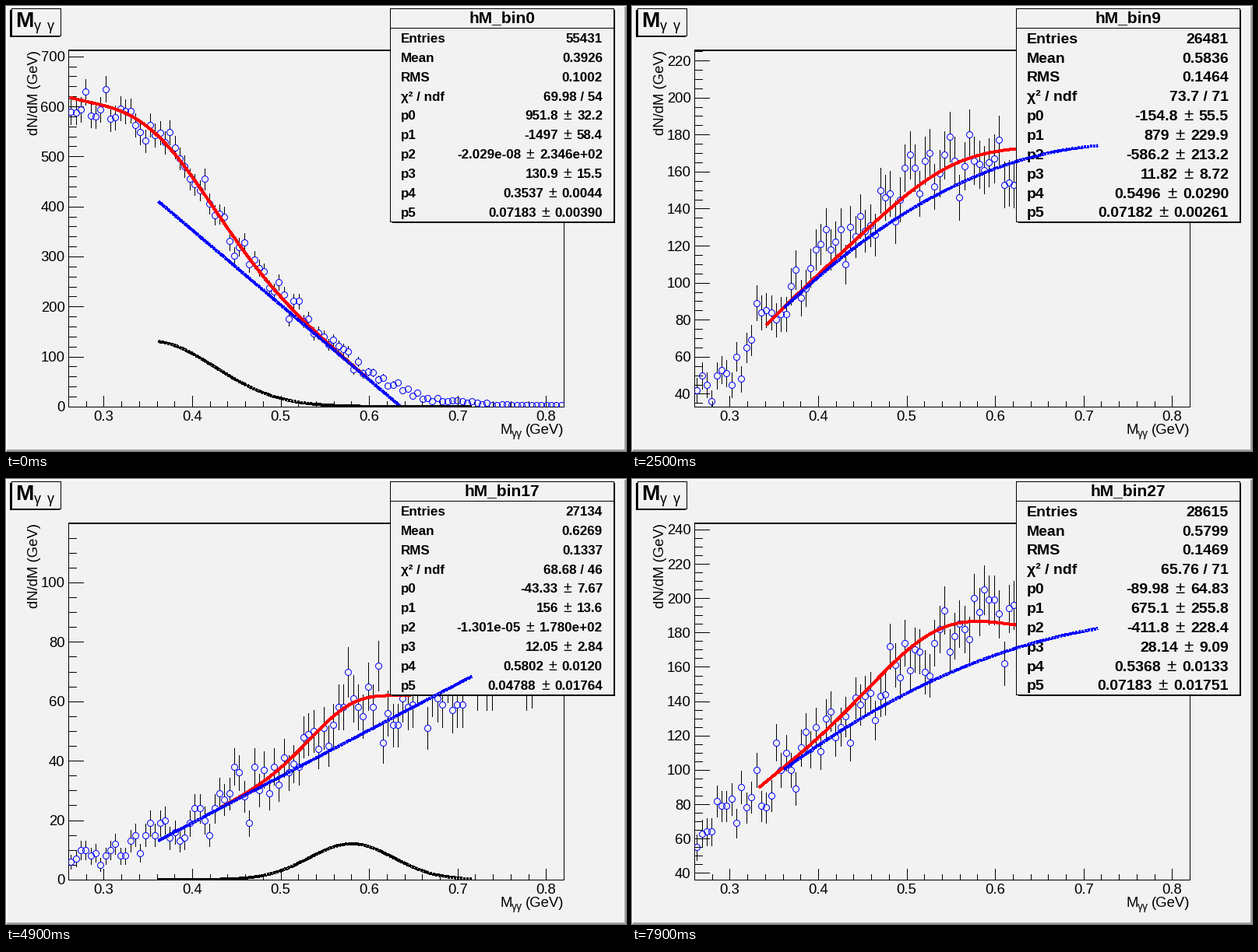
A matplotlib script for the animation above (8 s loop, 796 by 572 pixels).

```python
import numpy as np
import matplotlib.pyplot as plt
from matplotlib.animation import FuncAnimation
from matplotlib.patches import Rectangle

W, H, DPI = 796, 572, 100
PT = 72 / DPI
LEFT, RIGHT, TOP, BOTTOM = 80, 716, 57, 514.9
X_MIN, X_MAX, BIN = 0.26, 0.82, 0.0056
PAPER, BLUE = "#f2f2f2", "#0000ff"

# Key histograms; those in between are blended. Each holds the axis limits,
# the statistics, and the values and errors of the fit shown in the box:
# a quadratic background, then height, mean and sigma of the peak.
KEYS = {
    0: ((0, 712), (55431, .3926, .1002, 69.98, 54),
        (951.8, -1497, -2.029e-8, 130.9, .3537, .07183),
        (32.2, 58.4, 234.6, 15.5, .0044, .0039)),
    5: ((8.2, 212.5), (28101, .5931, .1419, 37, 47),
        (-14.02, 255.4, -1.216e-5, 34.07, .5624, .04788),
        (12.1, 22.4, 455, 4.75, .0074, .01528)),
    9: ((33.1, 225.5), (26481, .5836, .1464, 73.7, 71),
        (-154.8, 879, -586.2, 11.82, .5496, .07182),
        (55.5, 229.9, 213.2, 8.72, .029, .00261)),
    12: ((17.9, 682.8), (64323, .4793, .1331, 91.57, 71),
         (90.38, 2404, -3186, 80.67, .4929, .07183),
         (84.24, 361, 346.2, 13.61, .0083, .00163)),
    17: ((0, 119.9), (27134, .6269, .1337, 68.68, 46),
         (-43.33, 156, -1.301e-5, 12.05, .5802, .04788),
         (7.67, 13.6, 178, 2.84, .012, .01764)),
    23: ((18, 225.4), (30579, .5937, .1421, 48.96, 53),
         (-13.21, 269.1, -13.33, 47.79, .5674, .0522),
         (6.77, 4.9, 14.49, 4.75, .006, .0067)),
    27: ((36.1, 243.6), (28615, .5799, .1469, 65.76, 71),
         (-89.98, 675.1, -411.8, 28.14, .5368, .07183),
         (64.83, 255.8, 228.4, 9.09, .0133, .01751)),
}

fig = plt.figure(figsize=(W / DPI, H / DPI), dpi=DPI, facecolor=PAPER)
ax = fig.add_axes([0, 0, 1, 1])
ax.set(xlim=(0, W), ylim=(H, 0))
ax.axis("off")
frame_clip = Rectangle((LEFT, TOP), RIGHT - LEFT, BOTTOM - TOP,
                       transform=ax.transData)
moving = []


def px(x):
    return LEFT + (x - X_MIN) / (X_MAX - X_MIN) * (RIGHT - LEFT)


def text(x, y, s, size, ha="left", weight="normal", **kw):
    return ax.text(x, y, s, fontsize=size * PT, ha=ha, va="baseline",
                   weight=weight, family="Liberation Sans", zorder=5, **kw)


def box(x0, y0, x1, y1, color, z=4, edge="none"):
    ax.add_patch(Rectangle((x0, y0), x1 - x0, y1 - y0, fc=color, ec=edge,
                           lw=PT, zorder=z, antialiased=False))


def line(x, y, color="black", width=1, **kw):
    return ax.plot(x, y, color=color, lw=width * PT, antialiased=False,
                   solid_capstyle="butt", **kw)[0]


def segments(x0, y0, x1, y1, **kw):
    """Draw many short strokes as one line with gaps."""
    x0, y0, x1, y1 = np.broadcast_arrays(x0, y0, x1, y1)
    gap = np.full(x0.shape, np.nan)
    return line(np.column_stack([x0, x1, gap]).ravel(),
                np.column_stack([y0, y1, gap]).ravel(), **kw)


def draw_static():
    box(0, 0, W, 2, "#fcfcfc", 0)
    box(0, 0, 2, H, "#fcfcfc", 0)
    box(W - 2, 1, W, H, "#a1a1a1", 0)
    box(1, H - 2, W, H, "#a1a1a1", 0)

    line([LEFT, LEFT], [TOP, BOTTOM])
    line([RIGHT, RIGHT], [TOP, BOTTOM])
    line([LEFT, RIGHT], [BOTTOM, BOTTOM])
    line([LEFT, RIGHT], [TOP, TOP], width=2)

    for i in range(13, 42):
        x = px(i * 0.02)
        major = i % 5 == 0
        line([x, x], [BOTTOM, BOTTOM - (14 if major else 7)])
        if major:
            text(x, 533, f"{i * 0.02:.1f}", 18.5, "center")
    text(634, 550, "M", 18.5)
    text(649, 554, "γγ", 14)
    text(716, 550, "(GeV)", 18.5, "right")
    text(41, TOP, "dN/dM (GeV)", 18.5, "right", rotation=90,
         rotation_mode="anchor")

    box(5, 5, 69, 40, "black")
    box(7, 3, 70, 38, PAPER, 4.1, "black")
    text(12, 27, "M", 28, weight="bold")
    text(36, 31, "γ", 18)
    text(53, 31, "γ", 18)

    box(496, 5, 782, 279, "black")
    box(493, 3, 780, 277, PAPER, 4.1, "black")
    line([493, 781], [28, 28], zorder=4.2)


def blend(n):
    """Limits, statistics, values and errors of histogram n."""
    return [np.array([np.interp(n, list(KEYS), column)
                      for column in zip(*group)])
            for group in zip(*KEYS.values())]


def value_with_error(value, error):
    shown = f"{value:.4g}"
    if "e" in shown:
        return shown, f"{error:.3e}"
    decimals = max(1, len(shown.partition(".")[2]))
    return shown, f"{error:.{decimals}f}"


def draw_stats(n, stats, values, errors):
    entries, mean, rms, chi2, ndf = stats
    size = 17 if abs(values[2]) < 1e-3 else 19.5
    moving.append(text(636.5, 21, f"hM_bin{n}", 21, "center", "bold"))

    rows = [("Entries", f"{entries:.0f}"), ("Mean", f"{mean:.4g}"),
            ("RMS", f"{rms:.4g}"), ("χ² / ndf", f"{chi2:.4g} / {ndf:.0f}")]
    rows += [(f"p{i}", value_with_error(*pair))
             for i, pair in enumerate(zip(values, errors))]
    to_px = ax.transData.inverted()
    for i, (name, shown) in enumerate(rows):
        y = 47 + 24.85 * i + (size - 17) * 0.3
        moving.append(text(507, y, name, size, weight="bold"))
        if isinstance(shown, str):
            moving.append(text(766, y, shown, size, "right", "bold"))
            continue
        error = text(766, y, shown[1], size, "right", "bold")
        extent = error.get_window_extent()
        start = to_px.transform((extent.x0, extent.y0))[0]
        moving.extend([
            error,
            text(start - 0.7 * size, y, "±", size * 1.15, "center"),
            text(start - 1.41 * size, y, shown[0], size, "right", "bold")])


def draw_y_axis(lo, hi, py):
    step = next(s for s in (10, 20, 50, 100, 200) if (hi - lo) / s <= 10.5)
    parts = 4 if step in (20, 200) else 5
    minor = step / parts
    ticks = np.arange(np.ceil(lo / minor), np.floor(hi / minor) + 1)
    y = py(ticks * minor)
    moving.append(segments(LEFT, y, LEFT + np.where(ticks % parts, 10, 19), y))
    for t in ticks[ticks % parts == 0]:
        moving.append(text(75.5, py(t * minor) + 6.5, f"{t * minor:.0f}",
                           18.5, "right"))


def draw_points(n, model, softness, py):
    centers = X_MIN + BIN * (np.arange(100) + 0.5)
    # The spectrum follows the fit but levels off smoothly above zero.
    trend = softness * np.logaddexp(0, model(centers) / softness)
    noise = np.random.default_rng(40 + n).normal(size=100).clip(-2, 2)
    counts = np.maximum(trend + np.sqrt(trend) * noise, 3).round()
    x, y = px(centers), py(counts)
    artists = ax.plot(x, y, "o", ms=8 * PT, mfc="none", mec=BLUE, mew=PT,
                      zorder=2.1)
    for sign in (-1, 1):
        reach = np.maximum(y - py(counts + np.sqrt(counts)), 4)
        artists.append(segments(x, y + sign * 4, x, y + sign * reach, zorder=2))
    return artists


def draw_curves(values, ndf, background, peak, py):
    # The fit window leans towards the middle of the axis.
    center, half = 0.2 + 0.65 * values[4], BIN * (ndf + 6) / 2
    fit_x = np.linspace(max(center - half, X_MIN), center + half, 150)
    part_x = np.linspace(0.362, 0.716, 150)
    dotted = dict(width=2.6, zorder=6, linestyle=(0, (1.1, 0.6)),
                  dash_capstyle="butt")
    return [
        line(px(fit_x), py(background(fit_x) + peak(fit_x)), "red", 3, zorder=3),
        line(px(part_x), py(background(part_x)), BLUE, **dotted),
        line(px(part_x), py(peak(part_x)), **dotted)]


def update(i):
    while moving:
        moving.pop().remove()
    n = (i + 2) // 3
    (lo, hi), stats, values, errors = blend(n)
    p0, p1, p2, height, mean, sigma = values

    def py(v):
        return BOTTOM - (v - lo) / (hi - lo) * (BOTTOM - TOP)

    def background(x):
        return p0 + p1 * x + p2 * x * x

    def peak(x):
        return height * np.exp(-0.5 * ((x - mean) / sigma) ** 2)

    plotted = draw_points(n, lambda x: background(x) + peak(x), 0.08 * hi, py)
    plotted += draw_curves(values, stats[-1], background, peak, py)
    for artist in plotted:
        artist.set_clip_path(frame_clip)
    moving.extend(plotted)
    draw_y_axis(lo, hi, py)
    draw_stats(n, stats, values, errors)
    return moving


draw_static()
anim = FuncAnimation(fig, update, frames=80, interval=100, repeat=True,
                     repeat_delay=0, init_func=lambda: [])
plt.show()
```
